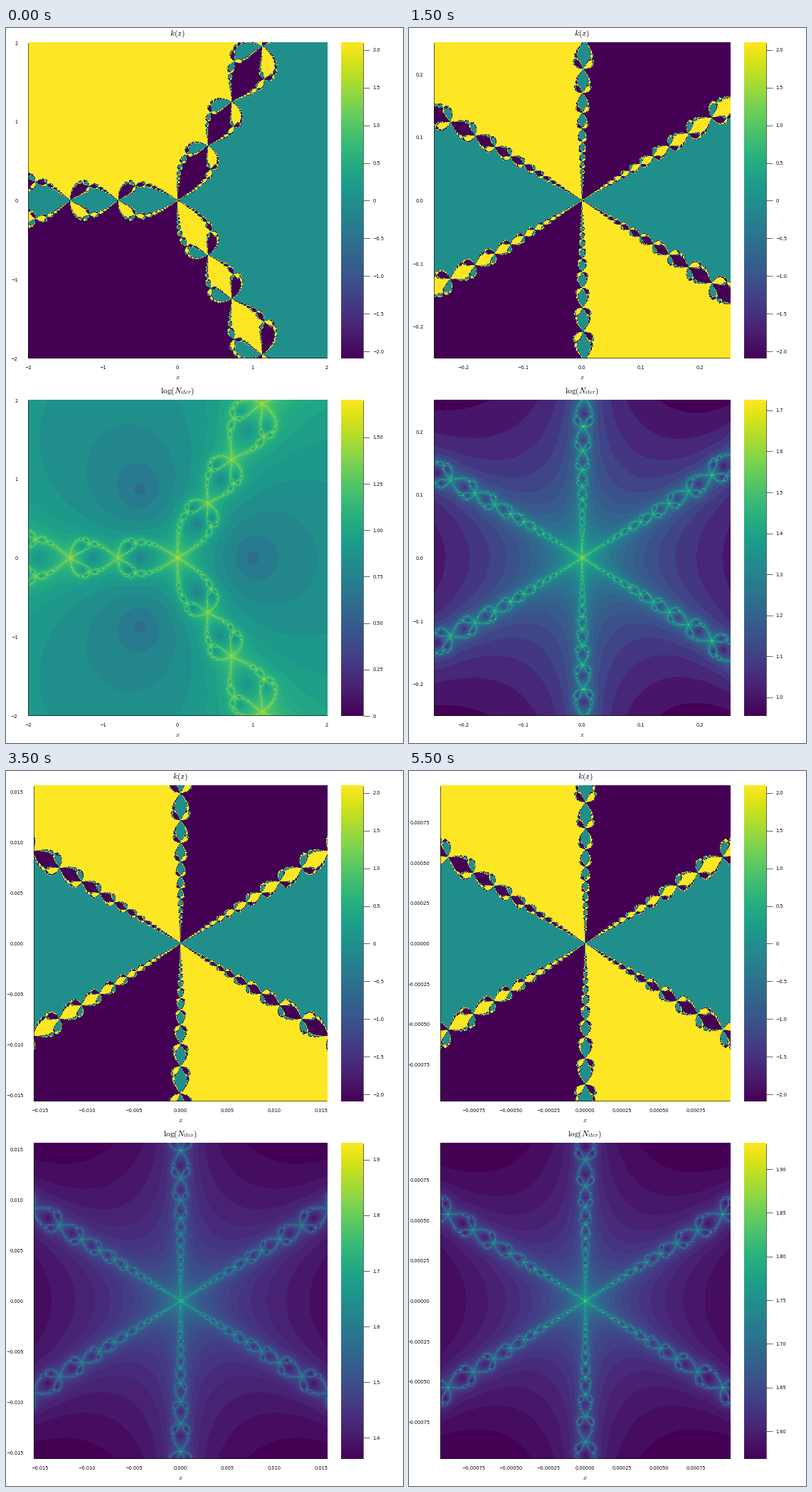
These frames come from a looping animation (558 px wide and 1004 px high, 6 s). A matplotlib script:

```python
import numpy as np
import matplotlib as mpl
import matplotlib.pyplot as plt
from matplotlib.animation import FuncAnimation

W, H, DPI = 558, 1004, 100
FRAMES, INTERVAL = 12, 500
TOL, MAX_ITER = 1e-9, 85
RIGHT, SIZE = 451, 443
TOPS = (21, 523)
LEFTS = (31, 35, 37, 39, 41, 44)  # by number of decimals in the labels
BAR_L, BAR_R = 471, 501.5

# per zoom level: tick step, decimals, fewest and most iterations
LEVELS = [
    (1, 0, 1, 50), (0.5, 1, 1, 50), (0.2, 1, 2, 51), (0.1, 1, 9, 53),
    (0.05, 2, 13, 61), (0.025, 3, 16, 69), (0.01, 2, 19, 77),
    (0.005, 3, 23, 85), (0.002, 3, 26, 85), (0.001, 3, 30, 85),
    (0.0005, 4, 33, 85), (0.00025, 5, 37, 85),
]

mpl.rcParams["font.family"] = "DejaVu Sans"
mpl.rcParams["mathtext.fontset"] = "cm"

# the small excess keeps the pixel size from rounding down
fig = plt.figure(figsize=((W + 0.01) / DPI, (H + 0.01) / DPI), dpi=DPI,
                 facecolor="white")
ax = fig.add_axes([0, 0, 1, 1])


def newton(half, cols):
    """Root angle and iteration count for z**3 = 1 on a square window."""
    x = ((np.arange(cols) + 0.5) / cols * 2 - 1) * half
    rows = SIZE // 2 + 1
    y = np.arange(rows)[::-1] * 2 * half / SIZE
    z = (x[None, :] + 1j * y[:, None]).ravel()
    z[z == 0] = half * 1e-6
    count = np.full(z.size, MAX_ITER)
    angle = np.zeros(z.size)
    live = np.arange(z.size)
    for n in range(1, MAX_ITER + 1):
        new = (2 * z + 1 / (z * z)) / 3
        step = new - z
        done = step.real ** 2 + step.imag ** 2 < TOL ** 2
        if done.any():
            count[live[done]] = n
            angle[live[done]] = np.angle(new[done])
            live, new = live[~done], new[~done]
        z = new
        if not live.size:
            break
    count = count.reshape(rows, cols)
    angle = angle.reshape(rows, cols)
    # the lower half mirrors the upper one
    return (np.vstack([angle, -angle[-2::-1]]),
            np.vstack([count, count[-2::-1]]))


def ticks(lo, hi, step):
    eps = 1e-6
    first, last = np.ceil(lo / step - eps), np.floor(hi / step + eps)
    return np.arange(first, last + 1) * step


def number(v, decimals):
    if abs(v) < 1e-9:
        v = 0
    return f"{v:.{decimals}f}".replace("-", "\u2212")


def label(x, y, s, px=6.67, ha="center", va="center_baseline"):
    ax.text(x, y, s, size=px * 72 / DPI, ha=ha, va=va, color="black")


def line(xs, ys):
    ax.plot(xs, ys, color="black", lw=0.6 * 72 / DPI, solid_capstyle="butt")


def picture(data, box, lo, hi):
    ax.imshow(data, cmap="viridis", vmin=lo, vmax=hi, extent=box,
              interpolation="nearest", aspect="auto")


def panel(data, top, title, lo, hi, half, step, decimals):
    left, bottom = LEFTS[decimals], top + SIZE
    mid_x, mid_y = (left + RIGHT) / 2, top + SIZE / 2
    picture(data, (left, RIGHT, bottom, top), lo, hi)
    line([left, left, RIGHT], [top, bottom - 0.5, bottom - 0.5])
    for v in ticks(-half, half, step):
        text = number(v, decimals)
        label(mid_x + v / half * (RIGHT - left) / 2, bottom + 12, text)
        label(left - 14.5, mid_y - v / half * SIZE / 2, text, ha="right")
    label(mid_x, top - 10.5, title, 11.67, va="baseline")
    label(mid_x + 0.3, bottom + 28.5, "$x$", 9.17, va="baseline")


def colorbar(top, lo, hi, step, decimals):
    bottom = top + SIZE
    picture(np.linspace(1, 0, 256)[:, None], (BAR_L, BAR_R, bottom, top), 0, 1)
    line([BAR_R, BAR_R], [top, bottom])
    for v in ticks(lo, hi, step):
        y = bottom - (v - lo) / (hi - lo) * SIZE
        line([BAR_R, BAR_R + 9.5], [y, y])
        text = "0" if abs(v) < 1e-9 else number(v, decimals)
        label(515.5, y, text, ha="left")


def bar_step(span):
    if span > 1:
        return 0.25, 2
    return (0.1, 1) if span > 0.5 else (0.05, 2)


fields = [newton(2 / 2 ** k, RIGHT - LEFTS[LEVELS[k][1]])
          for k in range(FRAMES)]


def draw(k):
    ax.clear()
    ax.axis("off")
    step, decimals, n_min, n_max = LEVELS[k]
    half = 2 / 2 ** k
    angle, count = fields[k]
    turn = 2 * np.pi / 3
    lo, hi = np.log10(n_min), np.log10(n_max)
    panel(angle, TOPS[0], "$k(z)$", -turn, turn, half, step, decimals)
    colorbar(TOPS[0], -turn, turn, 0.5, 1)
    panel(np.log10(count), TOPS[1], r"$\mathrm{log}(N_{iter})$",
          lo, hi, half, step, decimals)
    colorbar(TOPS[1], lo, hi, *bar_step(hi - lo))
    ax.set_xlim(0, W)
    ax.set_ylim(H, 0)
    return []


anim = FuncAnimation(fig, draw, frames=FRAMES, interval=INTERVAL,
                     init_func=lambda: [], repeat=True, repeat_delay=0)
plt.show()
```
